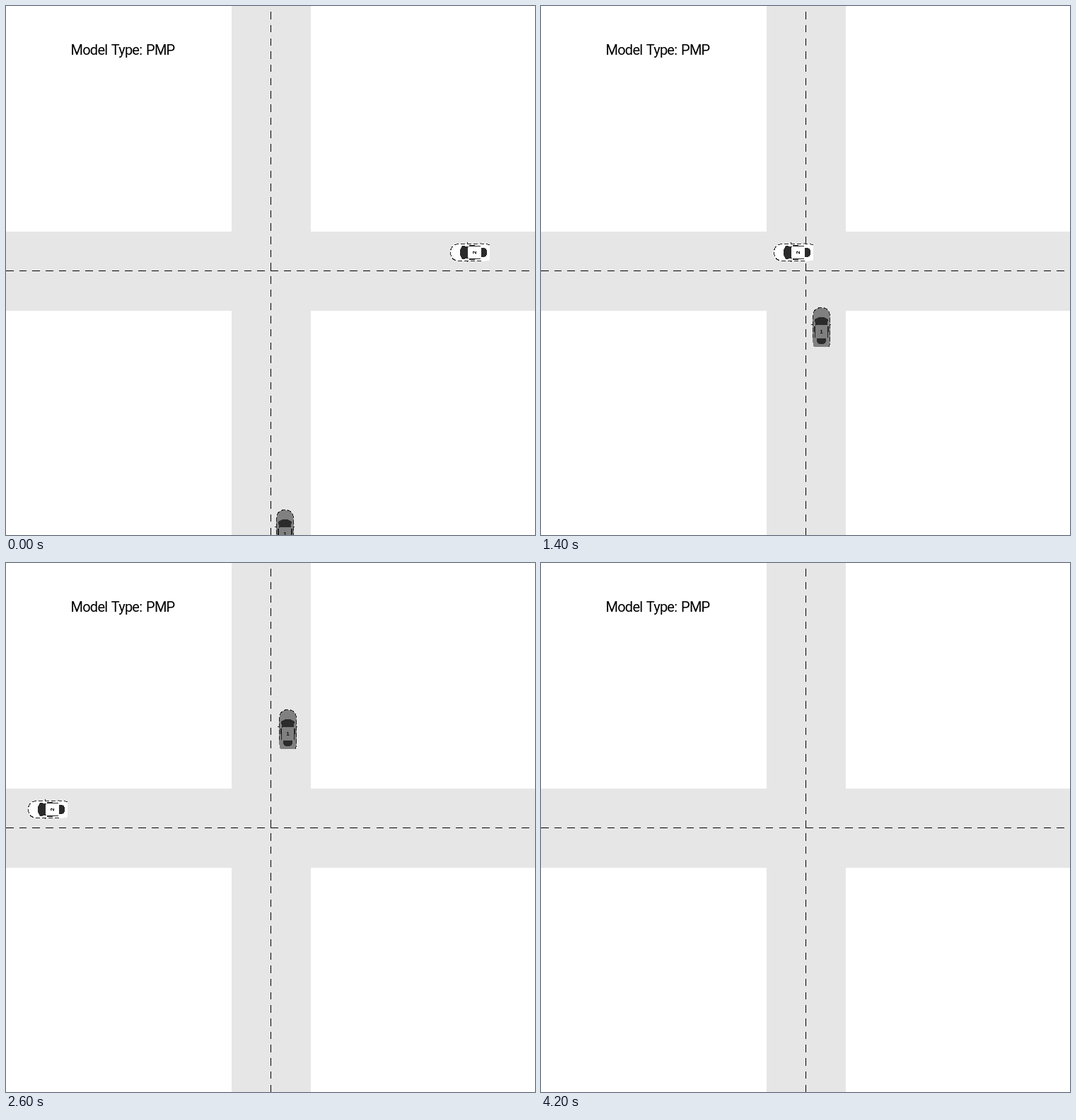
Recreate the animation shown at these times as an HTML page. Size 748x748 px, loop 5800 ms.

```html
<!DOCTYPE html>
<html lang="en">
<head>
<meta charset="utf-8">
<title>Intersection</title>
<style>
  html, body { margin: 0; width: 100%; height: 100%; overflow: hidden; background: #fff; }
  svg { display: block; width: 100%; height: 100%; shape-rendering: crispEdges; }
  .title { font: 20px Roboto, sans-serif; letter-spacing: -.75px; word-spacing: 1.5px; }
  .number { font: bold 8px "Liberation Sans", Arial, sans-serif; text-anchor: middle; }
</style>
</head>
<body>
<svg viewBox="0 0 748 748">
  <defs>
    <g id="shell">
      <path d="M-14 24.5l3-1M14 24.5l-3-1" stroke="#222"/>
      <path d="M-12 13Q-11.5 .5 0 .5T12 13L12.5 44Q12 54 10.5 55.5H-10.5Q-12 54 -12.5 44Z"/>
      <path d="M-12.5 44L-12 13Q-11.5 .5 0 .5T12 13L12.5 44Q12 54 10.5 55.5"
            fill="none" stroke="#222" stroke-dasharray="6 3"/>
      <path d="M-9.5 18Q-7 14 0 14T9.5 18L8 25.5Q0 24.5 -8 25.5Z
               M-6.5 43.5H6.5L6 49Q5 52 0 52T-6 49Z" fill="#2b2b2b"/>
      <path d="M-9.5 27L-9 43M9.5 27L9 43" stroke="#222" stroke-width="1.5"/>
    </g>
  </defs>
  <path d="M319 0H431V748H319ZM0 319H748V431H0Z" fill="#e6e6e6"/>
  <g stroke="#000" stroke-dasharray="10.5 8.2">
    <path d="M0 374.5H748"/>
    <path d="M374.5 748V0"/>
  </g>
  <text class="title" x="91.5" y="69">Model Type: PMP</text>
  <g id="white" fill="#fff">
    <use href="#shell"/>
    <text class="number" y="37" fill="#000">2</text>
  </g>
  <g id="gray" fill="#808080">
    <use href="#shell"/>
    <text class="number" y="37" fill="#111">1</text>
  </g>
</svg>
<script>
const LOOP = 5800, TICK = 200, SWITCH = 8;
const white = document.getElementById("white");
const gray = document.getElementById("gray");

// distance after n ticks from a starting speed and half the acceleration
const run = (n, speed, accel) => n * (speed + accel * n);
const place = (car, x, y, angle) =>
  car.setAttribute("transform", `translate(${x} ${y}) rotate(${angle})`);

function draw(now) {
  const tick = Math.floor(now % LOOP / TICK);
  const first = Math.min(tick, SWITCH), second = tick - first;
  // white speeds up to the crossing, then eases off; gray slows down, then cruises
  const x = 628 - run(first, 36, .96) - run(second, 51.35, -.35);
  const y = 712 - run(first, 44, -.44) - run(second, 36.2, 0);
  place(white, Math.round(x), 348.5, -90);
  place(gray, Math.round(394 + .32 * tick) + .5, Math.round(y), 0);
  requestAnimationFrame(draw);
}
draw(0);
</script>
</body>
</html>
```
